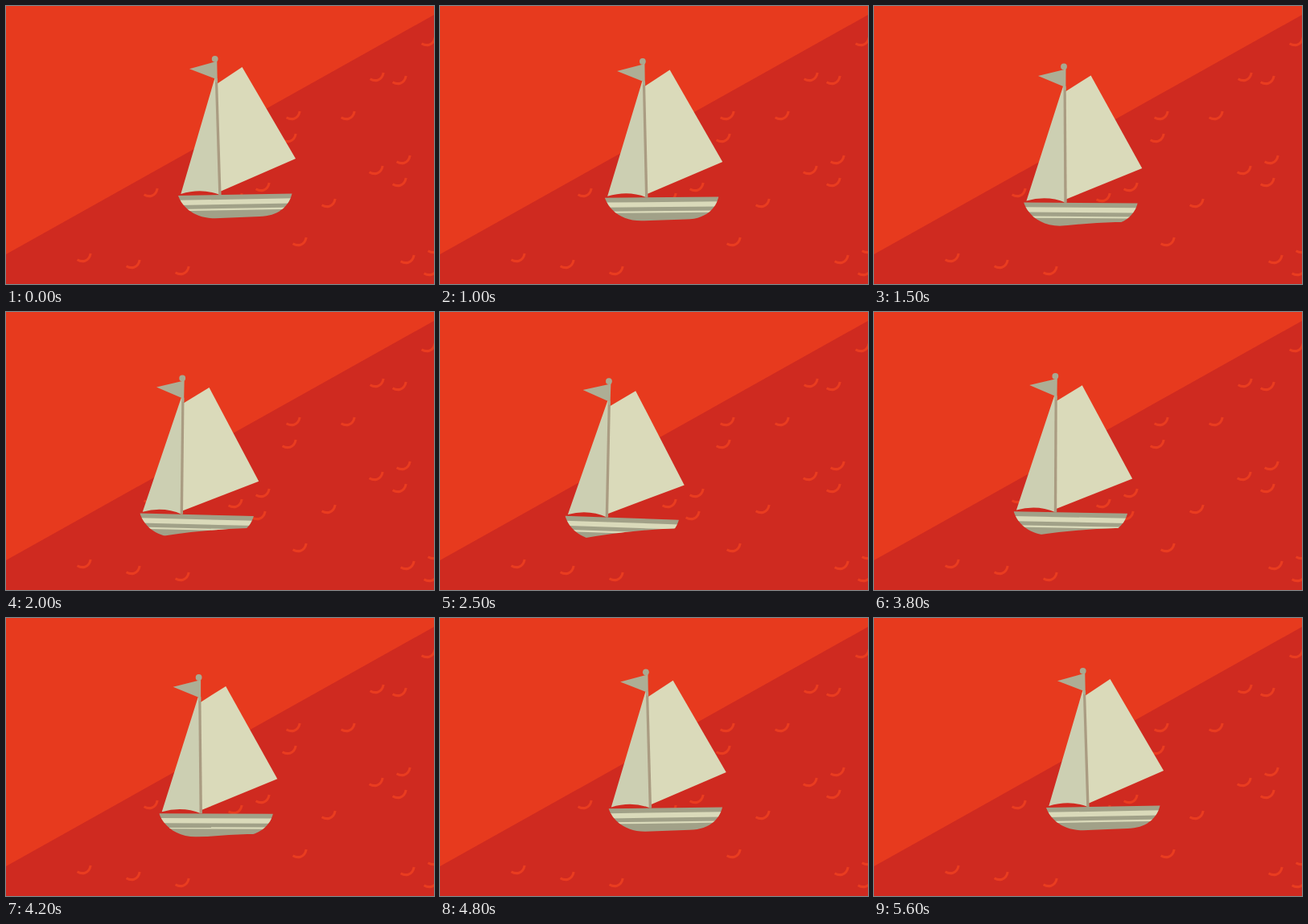
Write an HTML page that moves like this. It is 532 px wide and 346 px high and loops after 5700 ms.

```html
<!DOCTYPE html>
<html lang="en">
<head>
<meta charset="utf-8">
<title>Sailboat</title>
<style>
  html, body { margin: 0; width: 100%; height: 100%; overflow: hidden; background: #e73a1e; }
  svg { display: block; width: 532px; height: 346px; }
</style>
</head>
<body>
<svg viewBox="0 0 532 346">
  <defs>
    <path id="ripple" d="M-8.4 2.7C-3 6 6 6 8.2 -5"/>
    <clipPath id="waterline">
      <path d="M0 0H532V269H300Q235 271 170 283L0 312Z"/>
    </clipPath>
    <clipPath id="hull">
      <path d="M214 236L355.5 233.5C352 248 340 261.5 315 262L260 264.2C236 264.5 220 252 214 236Z"/>
    </clipPath>
  </defs>
  <rect width="532" height="346" fill="#e73a1e"/>
  <path d="M0 309L532 11V346H0Z" fill="#cf2a20"/>
  <g id="ripples" fill="none" stroke="#e93c20" stroke-width="3.1"></g>
  <g clip-path="url(#waterline)">
    <g id="boat">
      <path d="M259.4 90H262L266 235Q243 226 217.3 234Z" fill="#cccfb2"/>
      <path d="M262 97L293.5 76L360 190L266 231Z" fill="#dadaba"/>
      <path d="M259.8 90H263L267.6 235H264.2Z" fill="#aa9c82"/>
      <path d="M228 78.2L259.6 69.5V66H262.2L262.8 95H260V90.5Z" fill="#adae95"/>
      <circle cx="259.7" cy="65.8" r="3.9" fill="#a8a991"/>
      <g clip-path="url(#hull)" stroke="#dadaba">
        <rect x="210" y="230" width="150" height="38" fill="#a1a188" stroke="none"/>
        <path d="M210 245L360 242.4" stroke-width="6.2"/>
        <path d="M210 254.1L360 251.5" stroke-width="2.2"/>
      </g>
    </g>
  </g>
</svg>
<script>
  const LOOP = 5700, STEP = 100;
  const ripples = document.getElementById('ripples');
  const boat = document.getElementById('boat');

  // A straight run of evenly spaced ripples
  function run(x, y, dx = 0, dy = 0, count = 1) {
    for (let i = 0; i < count; i++) {
      ripples.innerHTML += `<use href="#ripple" x="${x + i * dx}" y="${y + i * dy}"/>`;
    }
  }

  const single = run;
  const column = (x, y) => run(x, y, -5, 28, 2);
  const slope = (x, y) => run(x, y, -36, 48, 2);
  const cluster = (x, y) => { column(x, y); single(x - 34, y + 13); };

  slope(525, 44);
  slope(461, 88);
  slope(401, 245);
  column(357, 136);
  cluster(494, 191);
  cluster(319, 225);
  cluster(533, 302);
  single(180, 232);
  run(97, 313, 61, 8, 3);

  // 0 at the upper end, 1 at the lower end; lingers near the upper end
  function drift(ms) {
    const swing = (1 - Math.cos(2 * Math.PI * (ms + 50) / LOOP)) / 2;
    return swing * swing * (2 - swing);
  }

  function draw(now) {
    const d = drift(Math.floor((now % LOOP) / STEP) * STEP);
    boat.setAttribute('transform',
      `translate(${-60.2 * d} ${22.1 * d}) rotate(${3.05 * d} 285 234.7)`);
  }

  const start = performance.now();
  function tick() {
    draw(performance.now() - start);
    requestAnimationFrame(tick);
  }
  tick();
</script>
</body>
</html>
```
